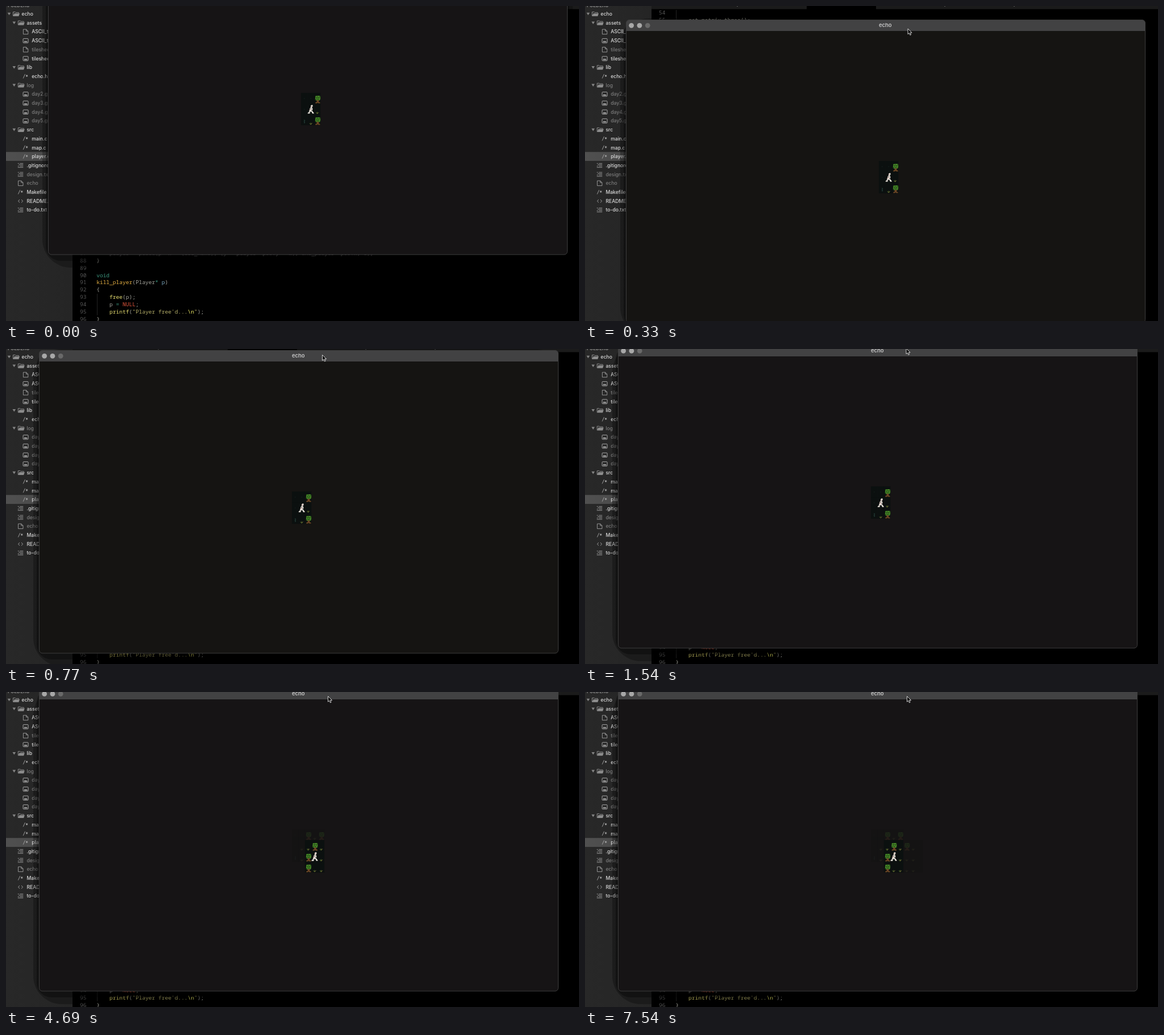
An HTML page that plays this animation: 1008 by 555 pixels, repeating every 7.99 s.

```html
<!DOCTYPE html>
<html lang="en">
<head>
<meta charset="utf-8">
<title>echo</title>
<style>
  html, body { margin: 0; width: 100%; height: 100%; overflow: hidden; background: #000; }
  svg { display: block; width: 1008px; height: 555px; }
  text { white-space: pre; }
  .side { font: 500 8.6px Inter, sans-serif; }
  .code { font: 9.55px "Noto Sans Mono", monospace; }
  .title { font: 600 9.5px Inter, sans-serif; }
</style>
</head>
<body>
<svg id="stage" viewBox="0 0 1008 555">
  <defs>
    <linearGradient id="sideFill">
      <stop offset="0" stop-color="#282828"/>
      <stop offset="1" stop-color="#252525"/>
    </linearGradient>
    <linearGradient id="rowFill">
      <stop offset="0" stop-color="#505050"/>
      <stop offset="1" stop-color="#464646"/>
    </linearGradient>
    <g id="folder">
      <path d="M.5 3.5V-3.5H4.2L5.2-2.5H10.5V-1.2" fill="none" stroke="#8c8c8c"/>
      <path d="M.4 4 2.5-1H12L10.4 4Z" fill="#8c8c8c"/>
    </g>
    <path id="arrow" d="M0-2.3H5.6L2.8 2.3Z" fill="#858585"/>
    <path id="doc" d="M.8-4.3H6L9.2-1.2V4.3H.8ZM6-4.3V-1.2H9.2" fill="none" stroke="#a2a2a2" stroke-width=".9"/>
    <g id="image">
      <rect x=".5" y="-3.7" width="9" height="7.6" rx="1" fill="none" stroke="#a8a8a8"/>
      <path d="M1.6 2.7 3.6-.2 5.2 1.3 6.6.1 8.4 2.7Z" fill="#a8a8a8"/>
    </g>
    <path id="lines" d="M0-3.5H2M3.5-3.5H9.5M1.5-1.2H9.5M0 1.2H2M3.5 1.2H9.5M0 3.5H9.5" stroke="#a2a2a2" stroke-width=".9"/>
    <path id="angles" d="M3.3-2.6.6 0 3.3 2.6M6.2-2.6 8.9 0 6.2 2.6" fill="none" stroke="#a2a2a2"/>
    <g id="comment" fill="none" stroke="#a8a8a8" stroke-width=".9">
      <path d="M.6 3.6 4-3.8M7-2.8V1M5.3-1.9 8.7.1M8.7-1.9 5.3.1"/>
    </g>
    <g id="T">
      <path d="M2.2 6 3.6 5H10.2L11.4 6.4V11.6L10 13.6H3.2L2 12Z" fill="#30661c"/>
      <path d="M3 6H5V7.4H3ZM6.5 5.6H9.4V7H6.5ZM2.4 9H4.4V10.6H2.4ZM5.6 8.6H8V10H5.6ZM9.2 8.4H11V10.2H9.2ZM4.2 11.6H6.4V12.8H4.2ZM8 11H10V12.4H8Z" fill="#559330"/>
      <path d="M4.8 7.8H6V9H4.8ZM8.2 7.6H9.2V9H8.2ZM6.6 10.4H7.8V11.6H6.6ZM3.2 10.8H4.2V11.8H3.2Z" fill="#173a12"/>
      <path d="M4.4 13H9L8.2 15.6 10.8 17V18.4H7.6L6.6 17.2 5.4 18.4H2.4V17L5.2 15.6Z" fill="#6b4524"/>
    </g>
    <g id="g" fill="none" stroke-width=".9">
      <path d="M5.7 18V14.6M5.7 17.8 3.4 15.6" stroke="#627b31"/>
      <path d="M5.9 17.8 8.1 15.3" stroke="#8d7d3b"/>
    </g>
    <path id="s" d="M4.8 10H6.6V12H5.4V13.4H6.6V15H5" fill="none" stroke="#28423b" stroke-width=".9"/>
    <path id="dot" d="M5.2 9.6H6.4V10.6H5.2Z" fill="#1b2b27"/>
    <g id="hero">
      <path d="M6 3.4 8.6 2 9.8 3.6 9.2 6 8.4 7.2 9.6 9.4 8.4 12.2 10 14.4 11.6 16.2V17.4H9L7 13.8 5.4 14.6 4.4 17.6H.8V16.2L2.6 15 3.6 12 4.4 9.4 5 7.4 6.2 6.4Z" fill="#e9e4dc"/>
      <path d="M6.6 4.2H8V5.2H6.6ZM4.6 10H5.8V11.4H4.6Z" fill="#cf8c86"/>
      <path d="M7.8 5.4H9V6.4H7.8ZM6 8H7V9.8H6ZM7.2 10.8H8V12.4H7.2ZM3.6 14.2H4.6V15.4H3.6Z" fill="#3b302f"/>
    </g>
  </defs>

  <rect width="1008" height="555" fill="#000"/>
  <path d="M117 0H390V5.5H117ZM512 0H1008V5.5H512Z" fill="#1b1b1b"/>
  <path d="M267 0H269V1H267ZM632 0H634V1H632ZM754 0H756V1H754Z" fill="#555"/>
  <g id="code" class="code"></g>
  <rect width="117" height="555" fill="url(#sideFill)"/>
  <rect y="257.2" width="117" height="15.7" fill="url(#rowFill)"/>
  <text x="3" y="2" fill="#8d8d8d" style="font:600 8.4px Inter, sans-serif">FOLDERS</text>
  <g id="tree" class="side"></g>

  <g id="win">
    <rect x="-10" y="-2" width="933" height="559" rx="50" opacity=".28"/>
    <rect x="-4" y="0" width="921" height="545" rx="26" opacity=".32"/>
    <rect id="pane" x=".5" y=".5" width="913" height="533.5" rx="5.5" fill="#161415"/>
    <path d="M.5 20V6A5.5 5.5 0 0 1 6 .5H908A5.5 5.5 0 0 1 913.5 6V20Z" fill="#424243"/>
    <rect x=".5" y=".5" width="913" height="533.5" rx="5.5" fill="none" stroke="#3d3d3d"/>
    <g fill="#a8a8a8">
      <circle cx="9.6" cy="10.3" r="4.4"/>
      <circle cx="23.9" cy="10.3" r="4.4"/>
      <circle cx="38.2" cy="10.3" r="4.4" fill="#696969"/>
    </g>
    <text class="title" x="456.3" y="13.4" text-anchor="middle" fill="#c6c6c6">echo</text>
    <g id="map"></g>
    <use id="player" href="#hero"/>
  </g>
  <path id="cursor" d="M.5 .5V10.2L2.8 8.2 4.4 11.8 6 11.1 4.5 7.6H7.6Z" fill="#000" stroke="#e8e8e8" stroke-width=".9"/>
</svg>
<script>
const LOOP = 7990;
const NS = "http://www.w3.org/2000/svg";
const $ = id => document.getElementById(id);

function add(parent, tag, attrs, text) {
  const el = document.createElementNS(NS, tag);
  for (const k in attrs) el.setAttribute(k, attrs[k]);
  if (text) el.textContent = text;
  return parent.appendChild(el);
}

// Sidebar: level, icon, name; a leading "~" marks a dimmed entry
const files = `0 folder echo
1 folder assets
2 doc ASCII_tiles.xcf
2 image ASCII_tiles.png
2 doc ~tilesheet.xcf
2 image tilesheet.png
1 folder lib
2 comment echo.h
1 folder ~log
2 image ~day2.gif
2 image ~day3.gif
2 image ~day4.gif
2 image ~day5.gif
1 folder src
2 comment main.c
2 comment map.c
2 comment player.c
1 lines .gitignore
1 lines ~design.txt
1 doc ~echo
1 comment Makefile
1 angles README.md
1 lines to-do.txt`.split("\n");

files.forEach((line, i) => {
  const [level, icon, name] = line.split(" ");
  const x = 12 + level * 8.8, y = 14 + i * 15.7;
  const dim = name[0] === "~";
  if (icon === "folder") add($("tree"), "use", { href: "#arrow", x: x - 9.3, y });
  add($("tree"), "use", { href: "#" + icon, x, y });
  add($("tree"), "text", { x: x + 15.6, y: y + 3, fill: dim ? "#7b7b7b" : "#dadada" }, name.replace("~", ""));
});

// Code: line number, indent, then [text, colour] runs
const grey = "#a3a39b", gold = "#e3ae42", teal = "#3c967f", yellow = "#e5dc70", olive = "#b4ae68";
const code = [
  [54, 0],
  [55, 4, ["get_matrix_three();", "#8d8d82"]],
  [87, 4, ["player = place(p->x + (col_name), (y * player->pos.y + w), and_player->pos.x, 1);", "#777"]],
  [88, 0, ["}", grey]],
  [89, 0],
  [90, 0, ["void", teal]],
  [91, 0, ["kill_player", gold], ["(Player", grey], ["*", teal], [" p", "#78a5bd"], [")", grey]],
  [92, 0, ["{", grey]],
  [93, 4, ["free", yellow], ["(p);", grey]],
  [94, 4, ["p ", grey], ["= ", teal], ["NULL", "#e0563c"], [";", grey]],
  [95, 4, ["printf", yellow], ["(", grey], ["\"Player free'd...", olive], ["\\n", "#f1ee68"], ["\"", olive], [");", grey]],
  [96, 0, ["}", grey]]
];
for (const [num, indent, ...runs] of code) {
  const y = 15.4 + (num - 54) * 12.84;
  add($("code"), "text", { x: 130, y, fill: "#555" }, String(num));
  const row = add($("code"), "text", { x: 159.2 + indent * 5.73, y });
  for (const [text, fill] of runs) add(row, "tspan", { fill }, text);
}
add($("code"), "path", { d: "M160.5 7V26M160.5 507V545", stroke: "#222" });

// Dungeon
const CW = 11.41, CH = 19.04, COL = 39, ROW = 12;
const rows = ["..TgT   ", ".ggTgTg.", "sgTgggg.", "  Tgggg."];
const cells = [];
rows.forEach((row, r) => [...row].forEach((kind, c) => {
  if (kind === " ") return;
  const x = (COL + c) * CW, y = 20.5 + (ROW + r) * CH;
  const el = add($("map"), "g", { transform: `translate(${x} ${y})` });
  add(el, "rect", { width: CW, height: CH, fill: "#0b100f" });
  const art = add(el, "use", { href: kind === "." ? "#dot" : "#" + kind });
  cells.push({ c, r, el, art });
}));

// Each step: time, then column and row (or x and y)
const walk = [[0, 1, 1], [2290, 2, 1], [4090, 3, 1], [4690, 3, 2], [5140, 4, 2], [5740, 5, 2],
  [6490, 6, 2], [6940, 5, 2], [7240, 4, 2], [7540, 3, 2]];
const drag = [[0, 74, -96], [180, 78, -13], [330, 72, 24], [480, 66, 23], [620, 59, 17],
  [770, 58, 2], [920, 58, -8], [1210, 58, -7]];
const pointer = [[0, 570, -80], [180, 574, 3], [330, 567.5, 39.5], [480, 561.5, 33], [620, 556, 25],
  [770, 556, 10], [920, 555, 8], [1070, 555.5, 8], [1210, 555, 7], [1360, 562, 1], [1540, 564.5, -1.5],
  [1690, 563.5, -3], [1840, 563, -6], [1990, 564.5, -1.5], [3340, 565.5, 6], [3490, 566, 7]];

const upTo = (list, t) => list.filter(s => s[0] <= t);
const at = (list, t) => upTo(list, t).pop();
const place = (el, x, y) => el.setAttribute("transform", `translate(${x} ${y})`);
const near = (cell, [, c, r]) => Math.abs(cell.c - c) < 2 && Math.abs(cell.r - r) < 2;

function draw(t) {
  const [, wx, wy] = at(drag, t);
  place($("win"), wx, wy);
  $("pane").setAttribute("fill", t >= 330 && t < 920 ? "#151412" : "#161415");
  const [, mx, my] = at(pointer, t);
  place($("cursor"), mx, my);

  const steps = upTo(walk, t), here = steps[steps.length - 1];
  for (const cell of cells) {
    const seen = steps.some(s => near(cell, s));
    cell.el.setAttribute("opacity", near(cell, here) ? 1 : seen ? .17 : 0);
    const under = cell.c === here[1] && cell.r === here[2];
    cell.art.setAttribute("visibility", under ? "hidden" : "visible");
  }
  place($("player"), (COL + here[1]) * CW - .4, 20.5 + (ROW + here[2]) * CH);
}

const start = performance.now();
function tick() {
  draw((performance.now() - start) % LOOP);
  requestAnimationFrame(tick);
}
tick();
</script>
</body>
</html>
```
